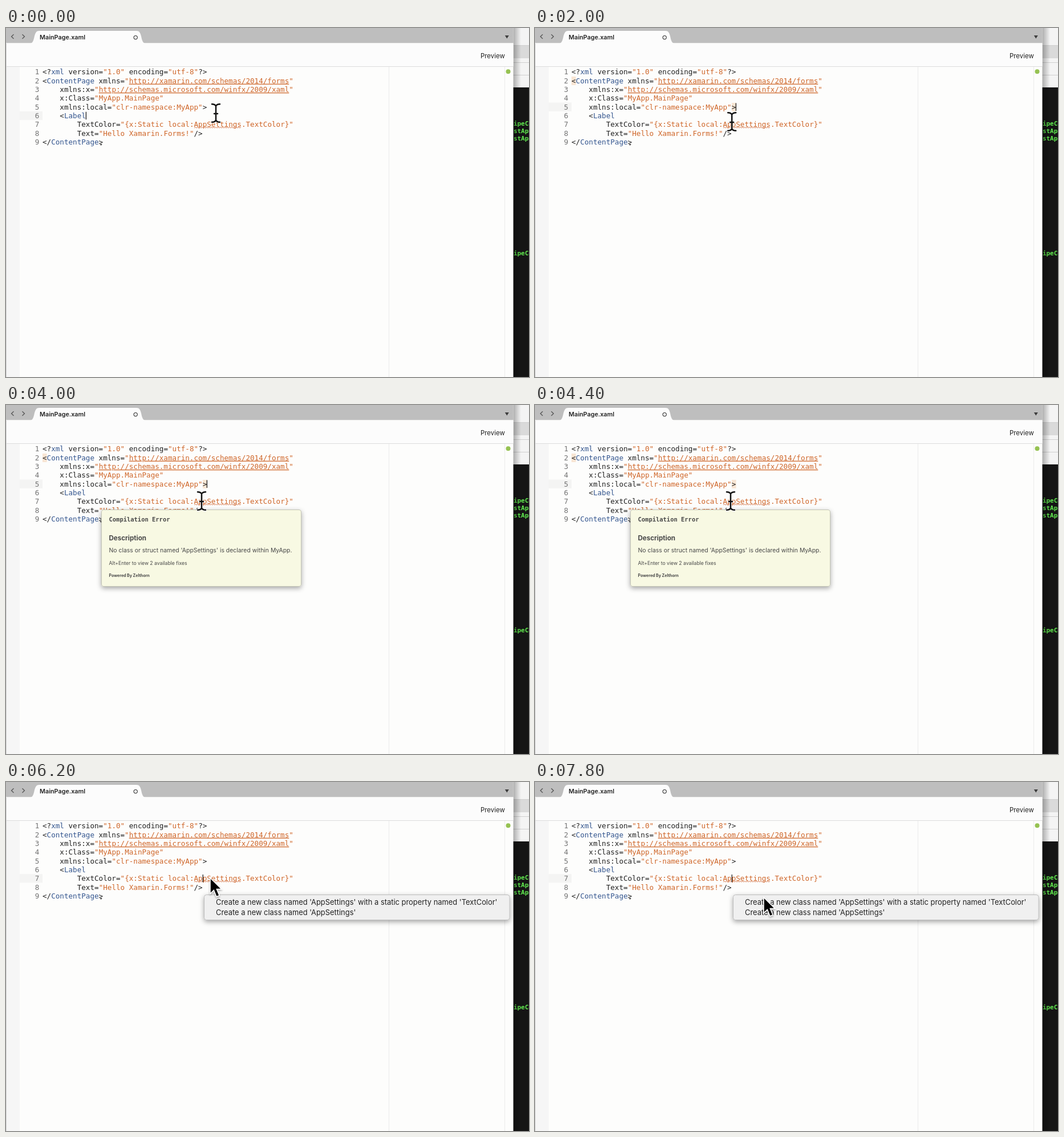
Animation, 917 px wide and 611 px high, one loop 8000 ms. Source, as an HTML page:

```html
<!DOCTYPE html>
<html lang="en">
<head>
<meta charset="utf-8">
<title>Code editor quick fix</title>
<style>
  html, body { margin: 0; width: 100%; height: 100%; overflow: hidden; background: #fdfdfc; }
  svg { display: block; width: 100vw; height: 100vh; }
  text { font-family: Inter, "Open Sans", sans-serif; fill: #222; white-space: pre; }
  .code text, .shell text, .mono { font-family: "DejaVu Sans Mono", monospace; }
  .code text { font-size: 12.6px; }
  .code .num { fill: #737373; text-anchor: end; }
  .tag { fill: #34568f; }
  .str { fill: #cf6629; }
  .link { text-decoration: underline; }
  .shell text { font-size: 10.9px; font-weight: bold; fill: #62ee50; }
  .tip text { fill: #484848; }
  .menu text { font-size: 12.9px; }
</style>
</head>
<body>
<svg viewBox="0 0 917 611">
  <defs>
    <linearGradient id="edge">
      <stop offset="0" stop-opacity=".3"/>
      <stop offset="1" stop-opacity="0"/>
    </linearGradient>
    <filter id="soft" x="-10%" y="-20%" width="120%" height="150%">
      <feDropShadow dx="0" dy="3" stdDeviation="4" flood-opacity=".35"/>
    </filter>
    <filter id="small" x="-50%" y="-30%" width="200%" height="170%">
      <feDropShadow dx="0" dy="2" stdDeviation="1.5" flood-opacity=".35"/>
    </filter>
  </defs>

  <g class="shell">
    <path fill="#f4f4f4" d="M889 0h28v104h-28z"/>
    <path fill="#dadada" d="M889 30h28v23h-28z"/>
    <path stroke="#cfcfcf" d="M889 30.5h28M889 60.5h28M889 82.5h28"/>
    <path fill="#151515" d="M889 104h28v507h-28z"/>
    <text x="890" y="170.5">ipeCo</text>
    <text x="890" y="183.5">stApp</text>
    <text x="890" y="196.5">stApp</text>
    <text x="890" y="397.5">ipeCo</text>
    <path fill="url(#edge)" d="M889 0h14v611h-14z"/>
  </g>

  <path fill="#fdfdfc" d="M0 0h889.5v611H0z"/>
  <path fill="#bebebe" d="M0 0h889.5v26.5H0z"/>
  <path fill="#fcfcfc" d="M0 26.5h889.5V67H0z"/>
  <path fill="#fcfcfc" d="M43 27C52 25 47 5 58 5H229C240 5 235 25 244 27Z"/>
  <path fill="#f6f6f6" d="M0 68h24v543H0z"/>
  <path stroke="#dcdcdc" d="M0 67.5h889"/>
  <path stroke="#ebebeb" d="M671.5 68v543M874.5 68v543"/>
  <path stroke="#d2d2d2" d="M.5 27v584"/>
  <path fill="none" stroke="#555" stroke-width="1.3" d="M13.5 11.2 9.5 15l4 3.8M28.5 11.2l4 3.8-4 3.8"/>
  <circle cx="227.2" cy="16.6" r="3.1" fill="none" stroke="#333" stroke-width="1.1"/>
  <path fill="#3c3c3c" d="M874.8 13h7l-3.5 5.5z"/>
  <circle cx="880.5" cy="76.3" r="4" fill="#96c252"/>
  <text x="59" y="20.2" font-size="10.8" font-weight="600">MainPage.xaml</text>
  <text x="832" y="53.3" font-size="11.4">Preview</text>

  <rect id="row" x="24" width="40" height="15.3" fill="#f4f4f3"/>
  <path id="match" fill="#f8e5d3" d="M64 85h7.6v15H64zM345 131h7.6v15H345z"/>
  <g class="code" id="code"></g>
  <path fill="none" stroke="#d9825a" stroke-width="1" id="squiggle"/>
  <path fill="#333" d="M164.6 203h4l-2 3z"/>
  <path id="caret" stroke="#111" stroke-width="1.2" d="M0 0v13.5"/>

  <g class="tip" id="tip">
    <rect x="167.5" y="183.5" width="350" height="134" rx="3.5" fill="#f8f9e3" stroke="#c4c5b6" filter="url(#soft)"/>
    <text class="mono" x="180.5" y="204" font-size="10.46" font-weight="bold">Compilation Error</text>
    <text x="180.5" y="236.8" font-size="11.6" font-weight="700">Description</text>
    <text x="180.5" y="257.8" font-size="10.42">No class or struct named 'AppSettings' is declared within MyApp.</text>
    <text x="180.5" y="279.8" font-size="8.65">Alt+Enter to view 2 available fixes</text>
    <text x="180.5" y="301" font-size="7" font-weight="700">Powered By Zelthorn</text>
  </g>

  <g class="menu" id="menu">
    <rect x="347.5" y="197.5" width="535.5" height="44" rx="4" fill="#f0f0f0" stroke="#bdbdbd" filter="url(#soft)"/>
    <path id="pick" fill="#589bf8" d="M348 201.5h534.5v18H348z"/>
    <text id="first" x="368" y="214.8">Create a new class named 'AppSettings' with a static property named 'TextColor'</text>
    <text x="368" y="233">Create a new class named 'AppSettings'</text>
  </g>

  <g id="beam" fill="none" stroke-linecap="round">
    <path id="beamShape" stroke="#fff" stroke-width="4.4" stroke-opacity=".75"
      d="M-7-15.8Q-1.5-15.8 0-12.2Q1.5-15.8 7-15.8M0-12.5V12.5M-7 15.8Q-1.5 15.8 0 12.2Q1.5 15.8 7 15.8M-3 1H3"/>
    <use href="#beamShape" id="beamInk"/>
  </g>
  <path id="arrow" fill="#000" stroke="#fff" stroke-width="1.5" filter="url(#small)"
    d="M0 0V27.5L6.3 21.4 11 32.8 16 30.7 11.3 19.6H19.8Z"/>
</svg>
<script>
const $ = id => document.getElementById(id);
const CHAR = 7.586, LEFT = 64, PITCH = 15.3, LOOP = 8000, STEP = 200;

const lines = [
  '<?xml version="1.0" encoding="utf-8"?>',
  '<ContentPage xmlns="http://xamarin.com/schemas/2014/forms"',
  '    xmlns:x="http://schemas.microsoft.com/winfx/2009/xaml"',
  '    x:Class="MyApp.MainPage"',
  '    xmlns:local="clr-namespace:MyApp">',
  '    <Label',
  '        TextColor="{x:Static local:AppSettings.TextColor}"',
  '        Text="Hello Xamarin.Forms!"/>',
  '</ContentPage>'
];

function add(parent, name, attrs, content = '') {
  const node = document.createElementNS(parent.namespaceURI, name);
  for (const key in attrs) node.setAttribute(key, attrs[key]);
  node.textContent = content;
  return parent.appendChild(node);
}

lines.forEach((line, i) => {
  const y = 81.4 + i * PITCH;
  const body = line.trimStart();
  add($('code'), 'text', { x: 58.3, y, class: 'num' }, i + 1);
  const row = add($('code'), 'text', { x: LEFT + (line.length - body.length) * CHAR, y });
  let inTag = false, inString = false;
  for (const part of body.split(/(<[/?]?|http:[^"]+|"|\w+)/).filter(Boolean)) {
    const quote = part === '"';
    const style = part.startsWith('http') ? 'str link'
      : quote || inString ? 'str'
      : inTag ? 'tag' : '';
    add(row, 'tspan', { class: style }, part);
    if (quote) inString = !inString;
    inTag = part[0] === '<';
  }
});

let wave = 'M330 175';
for (let x = 332; x <= 413; x += 2) wave += `L${x} ${x % 4 ? 175 : 173.6}`;
$('squiggle').setAttribute('d', wave);

$('beamInk').style.cssText = 'stroke:#111';
const ink = $('beamShape').cloneNode();
ink.removeAttribute('id');
ink.setAttribute('stroke', '#111');
ink.setAttribute('stroke-width', 2.5);
ink.setAttribute('stroke-opacity', 1);
$('beamInk').replaceWith(ink);

// time, x, y of the pointer's hot spot
const pointer = [
  [0, 368, 149], [200, 368, 149], [800, 357, 142.5], [1400, 357, 142.5],
  [2200, 343, 168], [5200, 343, 168],
  [5400, 343, 156], [6000, 343, 156], [6600, 401, 202], [LOOP, 401, 202]
];
const caretOn = [[0, 400], [800, 1400], [2000, 2400], [3000, 3400], [4000, 4400],
  [4800, 5400], [6000, 6400], [7600, 8000]];

const within = (t, a, b) => t >= a && t < b;
const show = (id, on) => $(id).style.visibility = on ? 'visible' : 'hidden';
const place = (id, x, y) => $(id).setAttribute('transform', `translate(${x} ${y})`);

function pointerAt(t) {
  const i = Math.max(1, pointer.findIndex(p => p[0] >= t));
  const [t0, x0, y0] = pointer[i - 1], [t1, x1, y1] = pointer[i];
  const k = (t - t0) / (t1 - t0), e = k * k * (3 - 2 * k);
  return [x0 + (x1 - x0) * e, y0 + (y1 - y0) * e];
}

function render(t) {
  const line = t < 800 ? 6 : t < 4800 ? 5 : 7;
  const top = 69.3 + (line - 1) * PITCH;
  $('row').setAttribute('y', top);
  place('caret', { 6: 140.4, 5: 352.4, 7: 345.3 }[line], top + 0.9);
  show('caret', caretOn.some(([a, b]) => within(t, a, b)));
  show('match', line === 5);
  show('tip', within(t, 3200, 4800));

  const picked = within(t, 6600, 7800);
  const open = t >= 6000;
  show('menu', open);
  show('pick', open && picked);
  $('first').style.fill = picked ? '#fff' : '';

  const arrow = t >= 5400;
  const [x, y] = pointerAt(t);
  show('beam', !arrow);
  show('arrow', arrow);
  place(arrow ? 'arrow' : 'beam', x, y);
}

const start = performance.now();
function tick() {
  const t = (performance.now() - start) % LOOP;
  render(Math.floor(t / STEP) * STEP);
  requestAnimationFrame(tick);
}
tick();
</script>
</body>
</html>
```
